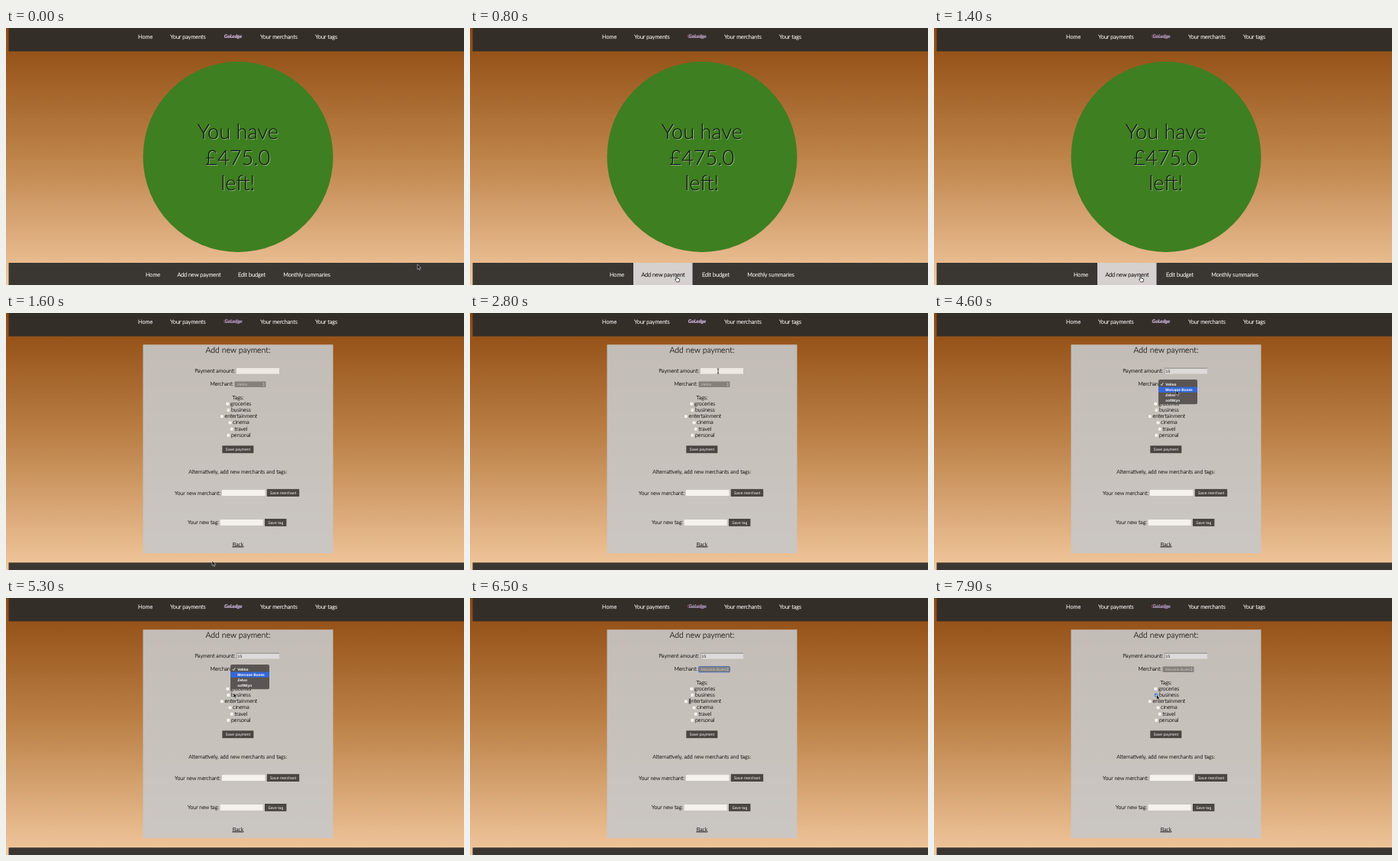
An HTML page for the animation above (8000 ms loop, 600 by 336 pixels).

```html
<!DOCTYPE html>
<html lang="en">
<head>
<meta charset="utf-8">
<title>Budget tracker</title>
<style>
html, body { margin: 0; width: 100%; height: 100%; overflow: hidden; background: #8b4513; }
svg { display: block; width: 600px; height: 336px; text-rendering: geometricPrecision; }
text { font: 300 7px Lato, sans-serif; color: #1c1a18; fill: currentColor; stroke: currentColor; stroke-width: .18px; white-space: pre; }
.mid { text-anchor: middle; }
.end { text-anchor: end; }
.nav { font-size: 7.3px; color: #f8f5f2; stroke-width: .25px; }
.dark { color: #1c1917; }
.big, .shade { font-size: 27.2px; stroke: none; color: #10120e; }
.shade { color: #c9d3c0; opacity: .6; }
.title { font-size: 10.5px; }
.ui { font: 5.1px "Liberation Sans", Arial, sans-serif; stroke: none; }
.light { color: #f4f1ee; }
.pick { color: #cbc5c0; font-size: 4.8px; }
.item { font-weight: 700; font-size: 4.8px; color: #fff; }
.logo { font: italic 700 6.4px Lato, sans-serif; stroke: none; }
</style>
</head>
<body>
<svg viewBox="0 0 600 336">
  <defs>
    <linearGradient id="sky" x1="0" y1="0" x2="0" y2="1">
      <stop offset="0" stop-color="#8d480f"/>
      <stop offset=".5" stop-color="#bd8349"/>
      <stop offset="1" stop-color="#f1c79d"/>
    </linearGradient>
  </defs>
  <rect width="600" height="336" fill="url(#sky)"/>
  <g id="page"></g>
  <g id="header"></g>
  <g id="cursor"></g>
</svg>
<script>
const LOOP = 8000;
const OPEN_FORM = 1550, FOCUS = 3000, OPEN_LIST = 4150, CLOSE_LIST = 5400, CHECK = 7450;
const merchants = ['Velmo', 'Morvane Buses', 'Zelvo', 'softWyn'];
const topLinks = [['Home', 182.7], ['Your payments', 238.5], ['Your merchants', 357.5], ['Your tags', 419.7]];
// label, centre, left and right edge of the hover area
const footLinks = [['Home', 192.5, 172, 213], ['Add new payment', 253, 214, 291.5],
  ['Edit budget', 322, 293, 351], ['Monthly summaries', 394, 352, 436]];
const tags = [['groceries', 288], ['business', 289], ['entertainment', 280.5],
  ['cinema', 291.2], ['travel', 293.4], ['personal', 289]];

// time, x, y, pointer shape
const path = [
  [0, 539, 309, 'arrow'], [100, 539, 309, 'arrow'], [750, 270, 324, 'arrow'],
  [1900, 270, 324, 'arrow'], [2500, 325, 76, 'beam'], [3300, 325, 76, 'arrow'],
  [3700, 321, 98, 'arrow'], [3900, 321, 98, 'arrow'], [4100, 320, 94, 'arrow'],
  [4250, 320, 94, 'arrow'], [4550, 317, 101, 'arrow'], [5000, 317, 101, 'arrow'],
  [5250, 298, 124, 'arrow'], [5500, 298, 124, 'arrow'],
  [6000, 288, 135, 'beam'], [6600, 288, 135, 'arrow'], [7000, 291.5, 126.5, 'arrow'],
  [LOOP, 291.5, 126.5, 'arrow']
];

// time, pink shift, blue shift, white shift, white opacity
const glitches = [
  [0, -.4, .5, 0, .75], [500, -1.2, 1, .5, .6], [900, .8, -.8, 0, .7], [1300, -.9, .8, .6, .5],
  [2100, -.4, .4, 0, .75], [4000, 1.2, -1, .3, .6], [4400, -.8, .5, 0, .7],
  [4900, -.5, .8, .2, .7], [5600, 1, -1.2, 0, .6], [6100, -1.1, .9, .8, .5]
];

const rect = (x, y, w, h, fill, more = '') =>
  `<rect x="${x}" y="${y}" width="${w}" height="${h}" fill="${fill}" ${more}/>`;
const text = (s, x, y, cls = '', more = '') => `<text x="${x}" y="${y}" class="${cls}" ${more}>${s}</text>`;
const button = (s, x, y, w) => rect(x, y, w, 9.8, '#4a4541') + text(s, x + w / 2, y + 6.7, 'ui light mid');
const ring = (x, y, w, h, width = 1) =>
  rect(x, y, w, h, 'none', `rx="1" stroke="#3f66cc" stroke-width="${width}"`);

function pointer(t) {
  const i = path.findIndex((p, k) => t < path[k + 1][0]);
  const [t0, x0, y0, kind] = path[i], [t1, x1, y1] = path[i + 1];
  const u = (t - t0) / (t1 - t0), e = u * u * (3 - 2 * u);
  return { x: x0 + (x1 - x0) * e, y: y0 + (y1 - y0) * e, kind };
}

function header(t) {
  const [, pink, blue, white, alpha] = glitches.filter(g => g[0] <= t).pop();
  const layer = (shift, color, opacity) =>
    text('GoLedge', 297.5 + shift, 13.3, 'logo mid', `style="color:${color}" opacity="${opacity}"`);
  return rect(3.5, 0, 596.5, 30.5, '#342e29') +
    topLinks.map(([s, x]) => text(s, x, 13.6, 'nav mid')).join('') +
    layer(pink, '#d0627f', .7) + layer(blue, '#7086d0', .7) + layer(white, '#e6d8e6', alpha);
}

function homePage(hover) {
  const lines = ['You have', '£475.0', 'left!'];
  const say = (cls, d) => lines.map((s, i) => text(s, 303.8 + d, 145 + d + i * 33.5, cls + ' mid')).join('');
  return '<circle cx="304" cy="168.5" r="124.5" fill="#3e7f22"/>' +
    say('shade', 1) + say('big', 0) +
    rect(3.5, 307, 596.5, 29, '#3a3632') +
    footLinks.map(([s, x, a, b], i) =>
      (i === hover ? rect(a, 307, b - a, 29, '#d6d1ce') : '') +
      text(s, x, 325.2, 'nav mid' + (i === hover ? ' dark' : ''))).join('');
}

function amountField(t) {
  const focused = t >= FOCUS && t < OPEN_LIST;
  const typed = t < 3300 ? '' : t < 3500 ? '1' : '15';
  const fill = focused ? '#dcdfee' : typed ? '#dedad9' : '#efe9e4';
  return rect(302, 72, 56, 7.6, fill) +
    (focused ? ring(301.8, 71.8, 56.4, 8) + rect(304 + typed.length * 2.85, 73.4, .5, 5, '#222')
      : typed ? rect(302, 71.8, 56, .7, '#6d6865') + rect(302, 72, .6, 7.6, '#8c8683') : '') +
    text(typed, 303.6, 77.8, 'ui');
}

function picker(t) {
  const chosen = t >= CLOSE_LIST;
  return rect(299.5, 89.6, 41, 7.3, '#85807b', 'rx="1"') +
    text(merchants[+chosen], 302.8, 95.1, 'ui pick') +
    '<path d="M336.6 92.6l1-1.4 1 1.4zM336.6 94l1 1.4 1-1.4z" fill="#e2ddd9"/>' +
    (chosen && t < CHECK ? ring(299.6, 89.6, 40.8, 7.3, .8) : '');
}

function list(t) {
  if (t < OPEN_LIST || t >= CLOSE_LIST) return '';
  const active = pointer(t).y < 96.7 ? 0 : 1;
  return rect(294, 87, 51, 32.3, '#575350', 'rx="2" opacity=".96"') +
    rect(294, 89.8 + active * 6.9, 51, 7, '#3468da') +
    merchants.map((s, i) => text(s, 303.3, 95 + i * 6.9, 'ui item')).join('') +
    '<path d="M297 93.2l1.2 1.5 2-3.4" fill="none" stroke="#fff" stroke-width=".8"/>';
}

function tagRow([name, x], i, t) {
  const y = 116.5 + i * 8.22, on = i === 1 && t >= CHECK;
  return rect(x, y, 4.6, 4.6, on ? '#3f7be0' : '#f6f3f0', 'rx=".8" stroke="#aaa39d" stroke-width=".4"') +
    (on ? `<path d="M${x + 1} ${y + 2.3}l1 1.2 1.6-2.5" fill="none" stroke="#fff" stroke-width=".7"/>` : '') +
    text(name, x + 6, y + 4.2);
}

function formPage(t) {
  return rect(179.5, 41.3, 249, 272.7, 'rgba(200,200,200,.9)') +
    text('Add new payment:', 304, 52, 'title mid') +
    text('Payment amount:', 300, 78, 'end') + amountField(t) +
    text('Merchant:', 298, 95.4, 'end') + picker(t) +
    text('Tags:', 304, 112.5, 'mid') +
    tags.map((tag, i) => tagRow(tag, i, t)).join('') +
    button('Save payment', 283.3, 173.4, 41) +
    text('Alternatively, add new merchants and tags:', 303.7, 209.7, 'mid') +
    text('Your new merchant:', 281, 237.6, 'end') +
    rect(283, 231.2, 56.5, 7.8, '#f5f1ed') + button('Save merchant', 341.8, 230.2, 42.4) +
    text('Your new tag:', 279, 276.2, 'end') +
    rect(280.6, 270, 56, 7.8, '#f5f1ed') + button('Save tag', 339, 269, 28.4) +
    text('Back', 304, 304.5, 'mid', 'text-decoration="underline"') +
    list(t) +
    rect(3.5, 326.3, 596.5, 9.7, '#3a3632');
}

function cursor({ x, y, kind }) {
  const shapes = {
    arrow: '<path d="M0 0V6.4L1.5 5.1 2.5 7.5 3.6 7 2.6 4.7H4.6Z" fill="#111" stroke="#eee" stroke-width=".5"/>',
    beam: '<path d="M-1.4-3.2Q0-3.2 0-2.2 0-3.2 1.4-3.2M0-2.4V2.4M-1.4 3.2Q0 3.2 0 2.2 0 3.2 1.4 3.2" fill="none" stroke="#222" stroke-width=".8"/>',
    hand: '<path d="M0 .6Q.6-.4 1.2.6V3L4 3.6Q4.8 4 4.6 5L4 8H1L-1.4 5Q-1.4 4 0 4.8Z" fill="#fff" stroke="#111" stroke-width=".7"/>'
  };
  return `<g transform="translate(${x} ${y})">${shapes[kind]}</g>`;
}

const shown = {};
function put(id, html) {
  if (shown[id] !== html) document.getElementById(id).innerHTML = shown[id] = html;
}

function draw() {
  const t = performance.now() % LOOP, p = pointer(t), home = t < OPEN_FORM;
  const hover = home && p.y > 307 ? footLinks.findIndex(f => p.x >= f[2] && p.x <= f[3]) : -1;
  if (hover >= 0) p.kind = 'hand';
  put('page', home ? homePage(hover) : formPage(t));
  put('header', header(t));
  put('cursor', cursor(p));
  requestAnimationFrame(draw);
}
draw();
</script>
</body>
</html>
```
